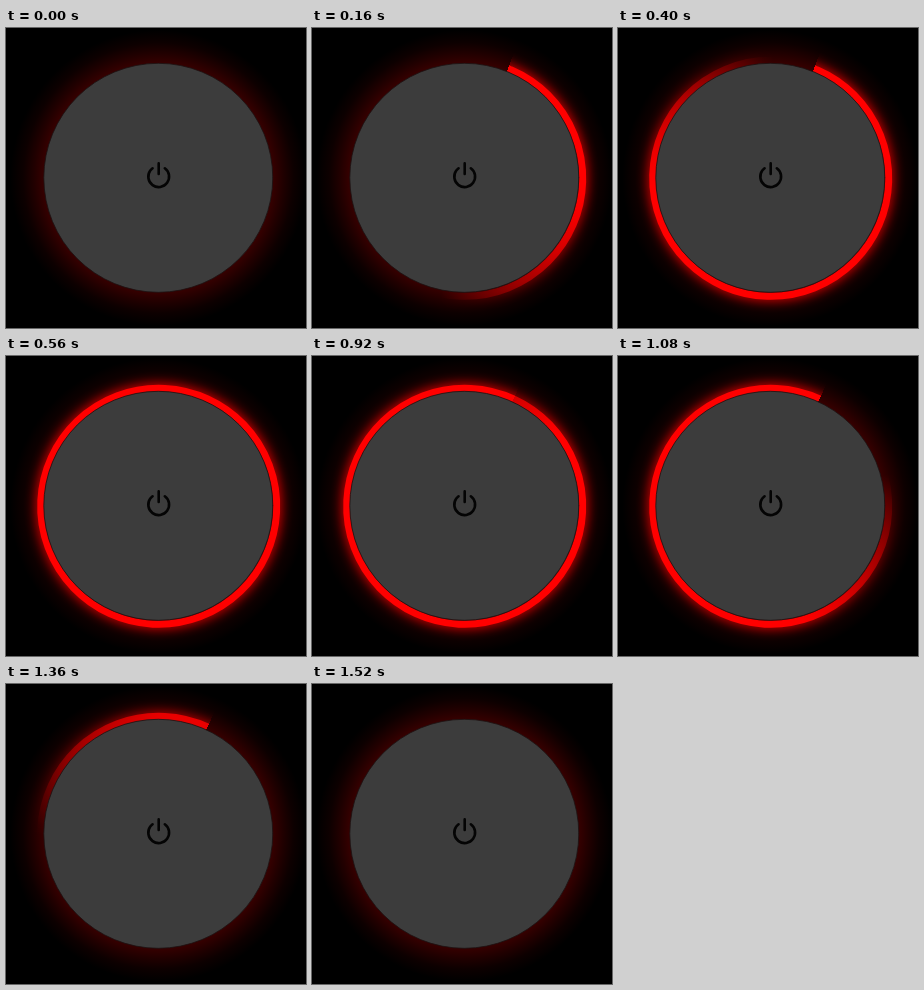
Write an HTML page with a canvas that moves like this. It is 300 px wide and 300 px high and loops after 1.8 s.

```html
<!DOCTYPE html>
<html lang="en">
<head>
<meta charset="utf-8">
<title>Power button</title>
<style>
  html, body { margin: 0; width: 100%; height: 100%; overflow: hidden; background: #000; }
  canvas { display: block; width: 300px; height: 300px; }
</style>
</head>
<body>
<canvas id="stage"></canvas>
<script>
const LOOP = 1800, STEP = 40;
const FILL_END = 560, DRAIN_START = 880, DRAIN_END = 1520;
const SOFT = 90;                                   // width of the soft edge, degrees
const SPEED = (360 + SOFT) / (DRAIN_END - DRAIN_START);
const TAU = Math.PI * 2;
const DISC = { x: 152.3, y: 149.8, r: 114.5 };
const RING = { x: 152.7, y: 150.3, r: 118, width: 7 };

const canvas = document.getElementById('stage');
const ctx = canvas.getContext('2d');
const ratio = window.devicePixelRatio || 1;
canvas.width = canvas.height = 300 * ratio;
ctx.scale(ratio, ratio);

const clamp = v => Math.max(0, Math.min(1, v));
const fromTop = deg => (deg - 90) * Math.PI / 180;

function drawHalo() {
  const glow = ctx.createRadialGradient(DISC.x, DISC.y, DISC.r, DISC.x, DISC.y, 148);
  glow.addColorStop(0, 'rgb(54,0,0)');
  glow.addColorStop(0.3, 'rgb(33,0,0)');
  glow.addColorStop(0.62, 'rgb(13,0,0)');
  glow.addColorStop(1, '#000');
  ctx.fillStyle = glow;
  ctx.fillRect(0, 0, 300, 300);
}

// Opacity of the ring at an angle measured clockwise from its start.
function ringAlpha(t, deg) {
  if (t < FILL_END) {
    const head = 360 + SOFT - SPEED * (FILL_END - t);
    return clamp((head - deg) / SOFT);
  }
  const tail = SPEED * (t - DRAIN_START) - SOFT;
  return clamp((deg - tail) / SOFT) * clamp((1560 - t) / 240);
}

function drawRing(t) {
  if (t < STEP || t >= DRAIN_END) return;
  const filling = t < FILL_END;
  const seam = filling ? 21.5 : 24.5;
  const start = filling ? 23.3 : seam;
  const paint = ctx.createConicGradient(fromTop(seam), RING.x, RING.y);
  for (let deg = 0; deg <= 360; deg += 5) {
    paint.addColorStop(deg / 360, `rgba(255,0,0,${ringAlpha(t, deg).toFixed(4)})`);
  }
  ctx.save();
  ctx.strokeStyle = paint;
  ctx.lineWidth = RING.width;
  ctx.lineCap = filling ? 'round' : 'butt';
  ctx.shadowColor = '#f00';
  ctx.shadowBlur = 11 * ratio;
  ctx.beginPath();
  ctx.arc(RING.x, RING.y, RING.r, fromTop(start), fromTop(seam + 360));
  ctx.stroke();
  ctx.restore();
}

function drawDisc() {
  ctx.beginPath();
  ctx.arc(DISC.x, DISC.y, DISC.r, 0, TAU);
  ctx.fillStyle = '#3c3c3c';
  ctx.fill();
  ctx.strokeStyle = '#1c1212';
  ctx.lineWidth = 0.8;
  ctx.stroke();
}

function drawIcon() {
  ctx.strokeStyle = '#040404';
  ctx.lineWidth = 2.6;
  ctx.lineCap = 'round';
  ctx.beginPath();
  ctx.arc(152.7, 148.7, 10.4, fromTop(36), fromTop(324));
  ctx.moveTo(152.7, 135.4);
  ctx.lineTo(152.7, 146);
  ctx.stroke();
}

function draw(t) {
  drawHalo();
  drawRing(t);
  drawDisc();
  drawIcon();
}

const origin = performance.now();
function tick() {
  const t = (performance.now() - origin) % LOOP;
  draw(Math.floor(t / STEP) * STEP);
  requestAnimationFrame(tick);
}
tick();
</script>
</body>
</html>
```
